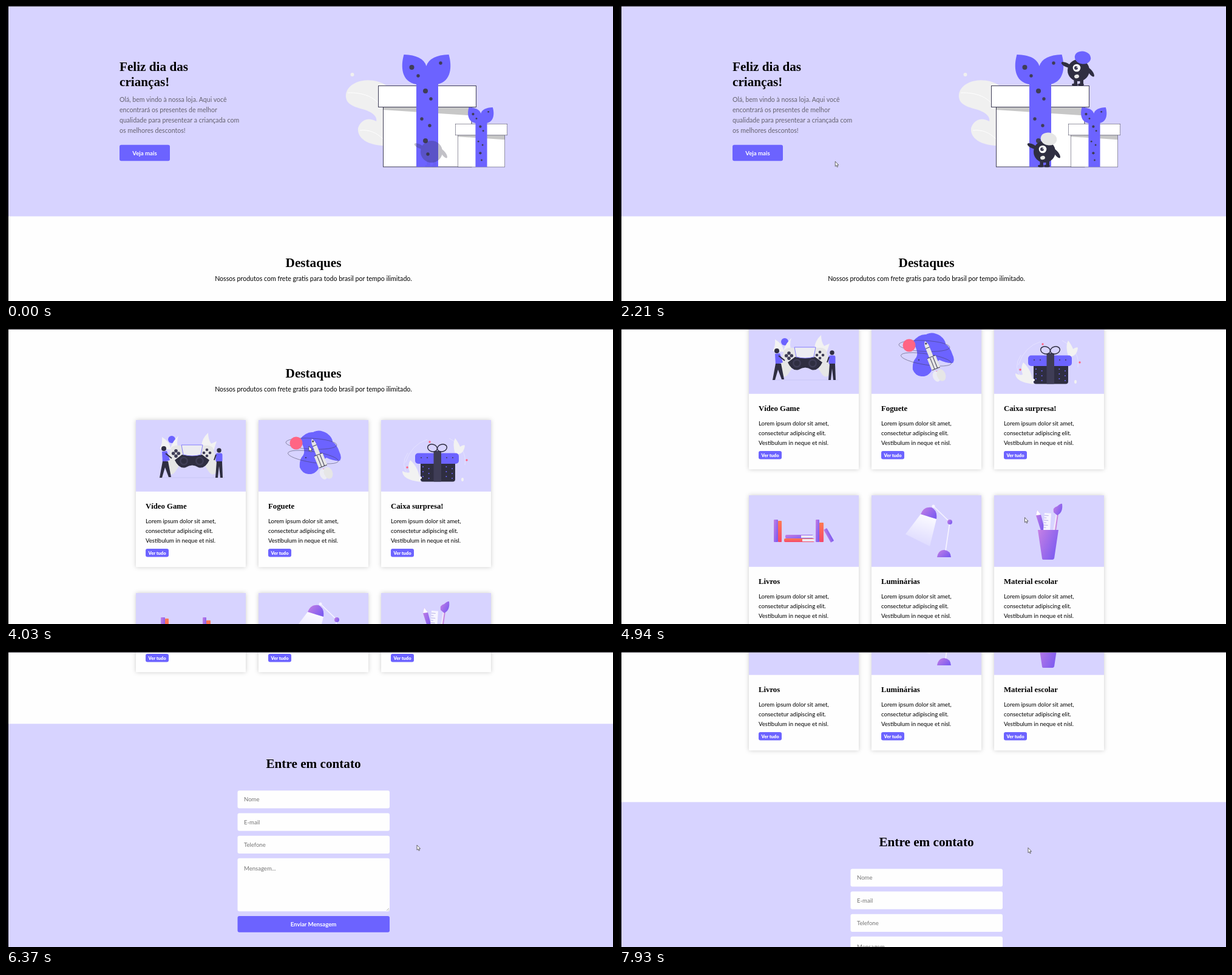
An HTML page that plays this animation: 1000x486 px, repeating every 8000 ms.

```html
<!DOCTYPE html>
<html lang="pt-BR">
<head>
<meta charset="utf-8">
<title>Loja de presentes</title>
<style>
html, body { margin: 0; width: 100%; height: 100%; overflow: hidden; background: #fefefe }
svg { display: block; width: 1000px; height: 486px; font: 10.6px Lato, sans-serif }
.h { font: bold 21.2px "Liberation Serif", serif }
.t { font: bold 12.75px "Liberation Serif", serif }
.s { font-size: 9.55px }
.b { font-size: 9.65px; font-weight: bold; fill: #fff }
.v { font-size: 7.5px; font-weight: 900; fill: #fff }
.mid { text-anchor: middle }
.card { filter: drop-shadow(0 0 3.6px #0003) }
</style>
</head>
<body>
<svg id="stage" viewBox="0 0 1000 486"></svg>
<script>
const PURPLE = '#6c63ff', LILAC = '#d7d3ff', DARK = '#2f2e41', SLATE = '#3f3d56', GREY = '#e6e6e6', PINK = '#ff6584';

// Drawing helpers
const rect = (x, y, w, h, fill, r = 0, more = '') =>
  `<rect x="${x}" y="${y}" width="${w}" height="${h}" rx="${r}" fill="${fill}" ${more}/>`;
const oval = (x, y, rx, ry, fill, turn = 0, more = '') =>
  `<ellipse rx="${rx}" ry="${ry}" fill="${fill}" transform="translate(${x} ${y}) rotate(${turn})" ${more}/>`;
const dot = (x, y, r, fill) => oval(x, y, r, r, fill);
const path = (d, fill, more = '') => `<path d="${d}" fill="${fill}" ${more}/>`;
const line = (d, color, w = 1) => path(d, 'none', `stroke="${color}" stroke-width="${w}"`);
const text = (x, y, str, cls, fill) =>
  `<text x="${x}" y="${y}" class="${cls}" ${fill ? `fill="${fill}"` : ''}>${str}</text>`;
const lines = (x, y, step, list, cls, fill) => list.map((s, i) => text(x, y + i * step, s, cls, fill)).join('');
const move = (x, y, body, more = '') => `<g transform="translate(${x} ${y}) ${more}">${body}</g>`;

const edge = `stroke="${SLATE}"`;
const gift =
  rect(621.5, 166.5, 145.5, 98.5, '#fff', 0, edge) +
  path('M621 167H767V180.5L621 171Z', '#000', 'opacity=".22"') +
  rect(613.5, 131.5, 161, 35, '#fff', 0, edge) +
  rect(676, 127, 36, 138, PURPLE) +
  path('M655.5 80Q687 81 692.5 99Q698 81 729.5 80C735 99 734 124 711 129H676C651 125 650 99 655.5 80Z', PURPLE) +
  [[668.5, 101, 4], [679, 115, 2.7], [716, 94, 2.7], [691, 140, 4], [700, 153, 2.7], [685, 186, 2.7],
   [698, 197, 2.7], [691, 222, 4], [695, 244, 2.7]].map(d => dot(...d, SLATE)).join('');

const leaves =
  path('M628 132C612 121 592 120 577 126C561 133 556 147 563 158C572 169 590 168 602 176C610 181 611 187 610 190C597 182 584 188 580 201C578 218 597 231 628 230Z', '#f0f0f0') +
  line('M563 143C588 142 608 150 618 166M583 205C598 203 611 209 621 219', '#fff') + dot(570.5, 113, 3, '#f0f0f0');

// A small creature whose parts fade in one after another, centred on its body
function creature(x, y, start, hat, raised) {
  const part = (delay, dur, body) => `<g class="part" data-at="${start + delay}" data-dur="${dur}">${body}</g>`;
  const arms = raised
    ? oval(-20, -11, 10, 3.2, DARK, 40) + oval(17.5, -11, 9.5, 3.2, DARK, -40)
    : oval(-20, -9, 9, 3.4, DARK, 25) + oval(20, 3, 9, 3.2, DARK, 53);
  const leg = lx => rect(lx - 2.5, 14, 5.5, 11, DARK, 2) + oval(lx - 1, 23.5, 5, 2, DARK);
  const ex = raised ? -1 : -3, ey = raised ? -2.5 : -4;
  return move(x, y,
    part(80, 350, leg(-5) + leg(5)) +
    part(0, 350, dot(0, 0, 18, DARK) + arms) +
    part(450, 300, oval(raised ? -4 : 7, -21, 13.3, 10.5, hat, 10)) +
    part(850, 300, dot(ex, ey, 6.3, '#fff') + dot(ex + (raised ? 0 : -1), ey, 3, SLATE) + dot(ex + .8, ey - 1, .9, '#fff') +
      oval(raised ? 0 : -3, 10, 4, 3.2, GREY, -15)));
}

const hero =
  rect(0, 0, 1000, 346.5, LILAC) +
  lines(187, 107, 25, ['Feliz dia das', 'crianças!'], 'h') +
  lines(187, 157.5, 17, ['Olá, bem vindo à nossa loja. Aqui você', 'encontrará os presentes de melhor',
    'qualidade para presentear a criançada com', 'os melhores descontos!'], '', '#65626f') +
  rect(187, 228.7, 83, 26.5, PURPLE, 3, 'id="more"') + text(228.5, 245.5, 'Veja mais', 'b mid') +
  leaves + gift + creature(757, 106, 1050, PURPLE) + move(414.5, 124.4, gift, 'scale(.531)') +
  creature(701, 240, -100, GREY) + creature(602, 240, 2220, PURPLE, true);

// Card pictures, 181 x 118
const pad4 = (x, y, r, d) => [[0, -d], [0, d], [-d, 0], [d, 0]].map(([a, b]) => dot(x + a, y + b, r, SLATE)).join('');
const videoGame =
  dot(59, 32, 6, PURPLE) +
  path('M39 47Q44 40 43 28Q56 36 57 46Q61 34 70 26Q66 36 70 50ZM108 42Q109 30 119 21Q119 32 124 39L133 35 126 56Z', '#f2f2f2') +
  line('M38 95H147', '#c3bff0', .7) +
  path('M58 46Q62 41 72 42H113Q123 41 127 46C131 58 136 78 132 87Q126 93 120 85L113 74H72L65 85Q59 93 53 87C49 78 54 58 58 46Z', GREY) +
  path('M76 57Q93 61 109 57L121 66Q114 81 103 78Q93 71 82 78Q71 81 64 66Z', DARK) +
  path('M75 41H110L107 57Q93 61 78 57Z', '#ececf2', `stroke="${PURPLE}" stroke-width=".8"`) +
  [79, 105].map(x => dot(x, 67.5, 7, SLATE) + dot(x, 67.5, 4.5, DARK)).join('') +
  pad4(66, 55, 2.8, 4.3) + pad4(117, 54, 2.3, 5) +
  dot(46, 47, 4, DARK) + path('M43 52L51 51 56 66 44 70Z', PURPLE) + line('M49 55L59 63', DARK, 2) +
  path('M44 68H53L58 94H54L48 78 43 95H39Z', DARK) +
  dot(137, 50, 3.7, DARK) + rect(131.5, 54.5, 11, 15, PURPLE, 3) + line('M132 57L129 66', DARK, 2) +
  path('M133 68H142L143 95H139L137 76 135 95H131Z', DARK);

const orbit = (x, y, turn) => oval(x, y, 42, 9, 'none', turn, `stroke="${SLATE}" stroke-width=".5"`);
const rocket =
  path('M68 32Q78 19 90 20Q100 14 113 22Q122 29 122 36Q129 40 133 52Q138 62 134 67Q124 68 112 62Q104 66 100 78Q94 90 82 89Q72 88 68 78Q67 66 72 60Q80 52 68 32Z', PURPLE) +
  orbit(87, 39, 3) + orbit(90, 61, 9) +
  dot(62, 38, 10.5, PINK) + dot(78, 62, 1, DARK) + dot(107, 81, 1, PINK) +
  move(88, 31,
    oval(-4, 61, 6, 9, '#ececf4') + oval(4, 62, 7, 10, GREY) +
    path('M0 0Q3.500 4 3.500 10V28H-3.500V10Q-3.500 4 0 0Z', GREY) + rect(-1.5, 3, 3, 3, SLATE, 1.5) +
    rect(-7.5, 28, 15, 22, GREY, 2) + line('M-3.500 12H3.500M-7 28H7M-2.500 29V49M2.500 29V49M-7 49H7', SLATE), 'rotate(-22)');

const surprise =
  line('M40 70Q50 40 76 32M112 30Q142 46 138 74M46 92Q30 74 44 54', '#edebff', .6) +
  path('M65 102Q34 98 35 84Q42 88 47 86Q43 74 48 66Q62 78 65 102ZM122 56Q117 38 122 30Q128 38 130 44Q136 40 138 42Q136 58 122 56Z', '#f2f2f2') +
  rect(65, 66, 57, 35.5, DARK, 4) +
  Array.from({ length: 18 }, (_, i) => dot(69 + i % 6 * 9.6, 77 + (i / 6 | 0) * 8 + i % 2 * 3, 1, PURPLE)).join('') +
  rect(56, 54.5, 72, 17.5, PURPLE, 5) +
  [66, 76, 108, 118].map(x => dot(x, 62, 1, SLATE)).join('') +
  rect(86.5, 51, 12.5, 50.5, SLATE, 1) +
  [[84.5, 15], [100.5, -15]].map(([x, a]) => oval(x, 46, 8, 6, 'none', a, `stroke="${DARK}" stroke-width="1.5"`)).join('') +
  [[80, 36], [141, 66], [43, 78]].map(([x, y]) => dot(x, y, 1.7, PINK)).join('') +
  dot(65, 95, 2, '#fff') + oval(134, 98, 2, 3, '#f2f2f2');

const books =
  rect(41, 40, 7, 37, 'url(#violet)', 1) + rect(48, 42, 6, 35, 'url(#red)', 1) +
  rect(60, 65, 46, 6, 'url(#violet)', 2) + rect(58, 71, 50, 6, 'url(#red)', 2) + rect(86, 66, 20, 4, '#ece9f6') +
  rect(88, 72, 20, 4, '#ece9f6') + rect(110, 40, 6, 37, 'url(#violet)', 1) + rect(116, 45, 7, 32, 'url(#red)', 1) +
  move(123, 57, rect(0, 0, 6, 24, 'url(#violet)', 1), 'rotate(-30)');

const lamp =
  path('M81 31L107 39 96 84 56 64Z', 'url(#glow)') +
  line('M101 17L129 44 122 91', '#f6f4ff', 1.7) + dot(102, 18, 2.5, '#f6f4ff') +
  path('M81 31Q86 18 99 20Q109 25 107 39Z', 'url(#violet)') + dot(129, 44, 4, 'url(#violet)') +
  path('M108 102Q110 90 120 90Q130 91 131 102Z', 'url(#violet)');

const school =
  path('M69 33L71 24 77 32 84 58H77Z', 'url(#violet)') + path('M69 33L71 24 77 32Z', '#fff') +
  move(83, 29, rect(0, 0, 11, 30, '#f6f4ff') +
    line([4, 8, 12, 16, 20, 24].map((y, i) => `M0 ${y}h${i % 2 ? 4 : 7}`).join(''), '#8d84d8', .6), 'rotate(4)') +
  line('M99 58L104 31', '#f0e6fa', 4) + line('M101 58L105 31', '#c987e0', 2) +
  path('M98 28Q96 20 104 18Q110 13 112 14Q114 28 104 33Z', 'url(#violet)') +
  path('M72 57H106L99 104Q98 106 96 106H82Q79 106 79 104Z', 'url(#violet)');

const card = (x, y, title, art) => move(x, y,
  `<g class="card">${rect(0, 0, 181, 242.3, '#fefefe', 1)}</g>` + rect(0, 0, 181, 117.8, LILAC) + art +
  text(16, 146.3, title, 't') +
  lines(16, 169.5, 16, ['Lorem ipsum dolor sit amet,', 'consectetur adipiscing elit.', 'Vestibulum in neque et nisl.'], 's') +
  rect(16, 212, 38, 13.5, PURPLE, 3) + text(35, 221.5, 'Ver tudo', 'v mid'));

const products =
  text(506.5, 430, 'Destaques', 'h mid') +
  text(506.5, 453, 'Nossos produtos com frete gratis para todo brasil por tempo ilimitado.', 'mid') +
  [['Vídeo Game', videoGame], ['Foguete', rocket], ['Caixa surpresa!', surprise],
   ['Livros', books], ['Luminárias', lamp], ['Material escolar', school]]
    .map(([title, art], i) => card(214 + i % 3 * 202, i < 3 ? 500 : 785, title, art)).join('');

const field = (y, h, label, base) =>
  rect(381.5, y, 250.5, h, '#fefefe', 3) + text(392, y + base, label, 's', '#757575');
const contact =
  rect(0, 1112.3, 1000, 500, LILAC) +
  text(506.5, 1185, 'Entre em contato', 'h mid') +
  field(1222.3, 29.3, 'Nome', 18) + field(1259.5, 29.3, 'E-mail', 18) + field(1296.7, 29.3, 'Telefone', 18) +
  field(1333.8, 87.5, 'Mensagem...', 20) + line('M627 1420l4-4M629.5 1420l1.5-1.5', '#888', .6) +
  rect(381.5, 1429, 250.5, 26.7, PURPLE, 3) + text(506.5, 1446, 'Enviar Mensagem', 'b mid');

const stop = (at, color, alpha = 1) => `<stop offset="${at}" stop-color="${color}" stop-opacity="${alpha}"/>`;
const gradient = (id, dirs, stops) => `<linearGradient id="${id}" ${dirs}>${stops}</linearGradient>`;

stage.innerHTML =
  '<defs>' +
  gradient('violet', 'x2="1" y2=".6"', stop(0, '#c680e4') + stop(1, '#7f5df0')) +
  gradient('red', 'x2="0" y2="1"', stop(0, '#ff7a52') + stop(1, '#f4476b')) +
  gradient('glow', 'x1=".6" x2=".3" y2="1"', stop(0, '#fff', .9) + stop(1, '#fff', .1)) +
  '</defs>' +
  rect(0, 0, 1000, 486, '#fefefe') +
  `<g id="page">${hero + products + contact}</g>` +
  rect(0, 0, 4, 486, '#000') + rect(4, 0, 996, 1, '#48464f') +
  `<g id="cursor" stroke="#444" stroke-width=".8" stroke-linejoin="round">
    <path id="arrow" d="M0 0V8.2L1.8 6.6 3.1 9.4 4.4 8.8 3.2 6.1H5.6Z" fill="#fff"/>
    <path id="hand" d="M-1 0Q0-1 1 0V4L5 5Q6 6 5.500 9L4.500 11H0L-3 7Q-3 5-1 6.500Z" fill="#fff"/></g>`;

// Rows of [time, ...values], eased between neighbours
const SCROLL = [[3330, 0], [3900, 350], [4450, 350], [4940, 511], [5150, 511], [6050, 994], [7450, 994], [7930, 865]];
const POINTER = [[1000, 580, 318], [1170, 564, 280], [1550, 564, 280], [2650, 244, 243], [3450, 244, 243], [4030, 499, 193],
  [4450, 499, 193], [4940, 668.5, 310.5], [5500, 668.5, 310.5], [6370, 677, 318], [7400, 677, 318], [7930, 674, 322.5]];

const clamp = v => Math.min(1, Math.max(0, v));
function track(keys, t) {
  const i = keys.findIndex(k => k[0] > t);
  if (i < 0) return keys.at(-1).slice(1);
  if (!i) return keys[0].slice(1);
  const [a, b] = [keys[i - 1], keys[i]], u = (t - a[0]) / (b[0] - a[0]), e = u * u * (3 - 2 * u);
  return a.slice(1).map((v, j) => v + (b[j + 1] - v) * e);
}

const $ = id => document.getElementById(id);
const page = $('page'), cursor = $('cursor'), arrow = $('arrow'), hand = $('hand'), more = $('more');
const parts = [...document.querySelectorAll('.part')];

function draw(now) {
  const t = now % 8000, [scroll] = track(SCROLL, t), [x, y] = track(POINTER, t);
  page.setAttribute('transform', `translate(0 ${-scroll})`);
  for (const p of parts) p.setAttribute('opacity', clamp((t - p.dataset.at) / p.dataset.dur));
  const over = x > 187 && x < 270 && y + scroll > 229 && y + scroll < 255;
  more.setAttribute('fill', over ? '#7971ff' : PURPLE);
  cursor.setAttribute('transform', `translate(${x} ${y})`);
  cursor.setAttribute('visibility', t < 1000 ? 'hidden' : 'visible');
  arrow.setAttribute('opacity', over ? 0 : 1);
  hand.setAttribute('opacity', over ? 1 : 0);
  requestAnimationFrame(() => draw(performance.now()));
}
draw(0);
</script>
</body>
</html>
```
